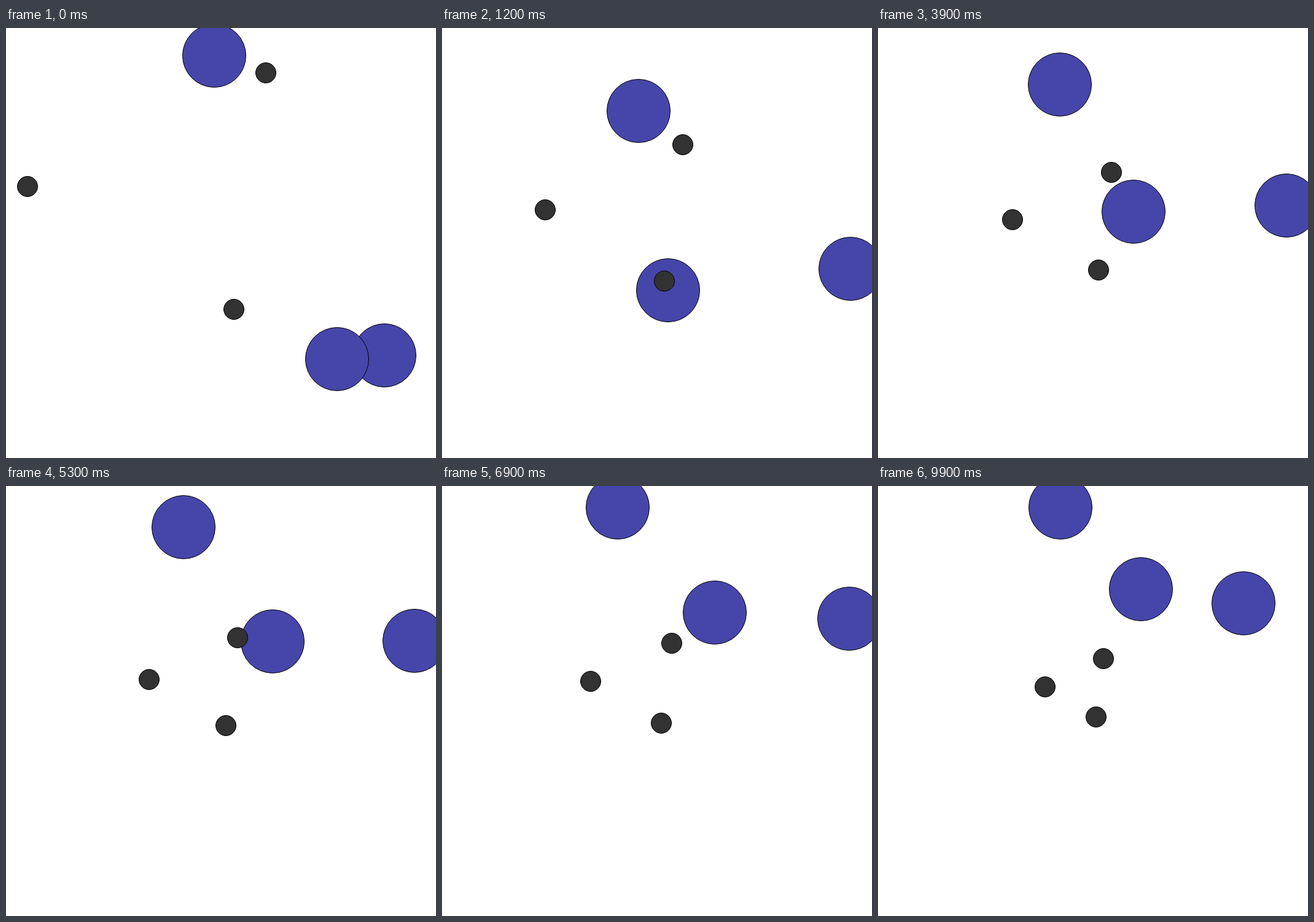
An HTML page with a canvas for the animation above (10 s loop, 700 by 700 pixels).

```html
<!DOCTYPE html>
<html>
<head>
<meta charset="utf-8">
<style>
html, body { margin: 0; width: 100%; height: 100%; overflow: hidden; background: #fff; }
canvas { display: block; }
</style>
</head>
<body>
<canvas id="stage" width="700" height="700"></canvas>
<script>
const ctx = document.getElementById('stage').getContext('2d');

// World coordinates are relative to the stage centre; the view zooms out
// so that everything stays within LIMIT of it.
const LIMIT = 315, LOOP = 10000, STEP = 100;
const times = [0, .2, .5, .8, 1.2, 2.5, 3.9, 5.3, 6.9, 8.8, 9.9];
const movers = [
  { x: [-10.5, -17.3, -27.5, -37.6, -51.2, -92.8, -129.5, -163.3, -186.9, -205, -213.4],
    y: [-304.5, -304, -317, -338, -372, -487, -623.5, -762.5, -927, -1145, -1280.5] },
  { x: [266.5, 356, 441.5, 495.7, 546.4, 657, 762.7, 850, 922, 980, 998],
    y: [183.5, 162.4, 134, 107.5, 73.7, -32.3, -146.5, -263, -393, -553, -644] },
  { x: [189.5, 111, 53.4, 33, 32.1, 88.6, 161, 228, 278, 306, 319],
    y: [189.5, 195, 186, 167, 134.4, 13.6, -122, -260.5, -422, -621, -738] }
];
const anchors = [[-315, -91.95], [73.1, -276.6], [21.8, 108.2]];

// Slope at key i, weighted for uneven spacing
function slope(v, i) {
  const rate = k => (v[k + 1] - v[k]) / (times[k + 1] - times[k]);
  const last = times.length - 1;
  if (i === 0) return 1.5 * rate(0) - .5 * slope(v, 1);
  if (i === last) return rate(last - 1);
  const a = times[i] - times[i - 1], b = times[i + 1] - times[i];
  return (rate(i - 1) * b + rate(i) * a) / (a + b);
}

function sample(v, t) {
  let i = 0;
  while (i < times.length - 2 && t > times[i + 1]) i++;
  const h = times[i + 1] - times[i], u = (t - times[i]) / h, w = 1 - u;
  return w * w * ((1 + 2 * u) * v[i] + u * h * slope(v, i)) +
         u * u * ((1 + 2 * w) * v[i + 1] - w * h * slope(v, i + 1));
}

function disc([x, y], zoom, radius, fill) {
  const place = v => Math.floor(350 + v * zoom + 1e-6);
  ctx.beginPath();
  ctx.arc(place(x), place(y), radius - .5, 0, 2 * Math.PI);
  ctx.fillStyle = fill;
  ctx.fill();
  ctx.stroke();
}

function draw() {
  const t = Math.floor(performance.now() % LOOP / STEP) * STEP / 1000;
  const spots = movers.map(m => [sample(m.x, t), sample(m.y, t)]);
  const zoom = LIMIT / Math.max(LIMIT, ...spots.flat().map(Math.abs));
  ctx.clearRect(0, 0, 700, 700);
  ctx.strokeStyle = '#000';
  spots.forEach(p => disc(p, zoom, 52, '#4646aa'));
  anchors.forEach(p => disc(p, zoom, 17, '#323232'));
  requestAnimationFrame(draw);
}
draw();
</script>
</body>
</html>
```
